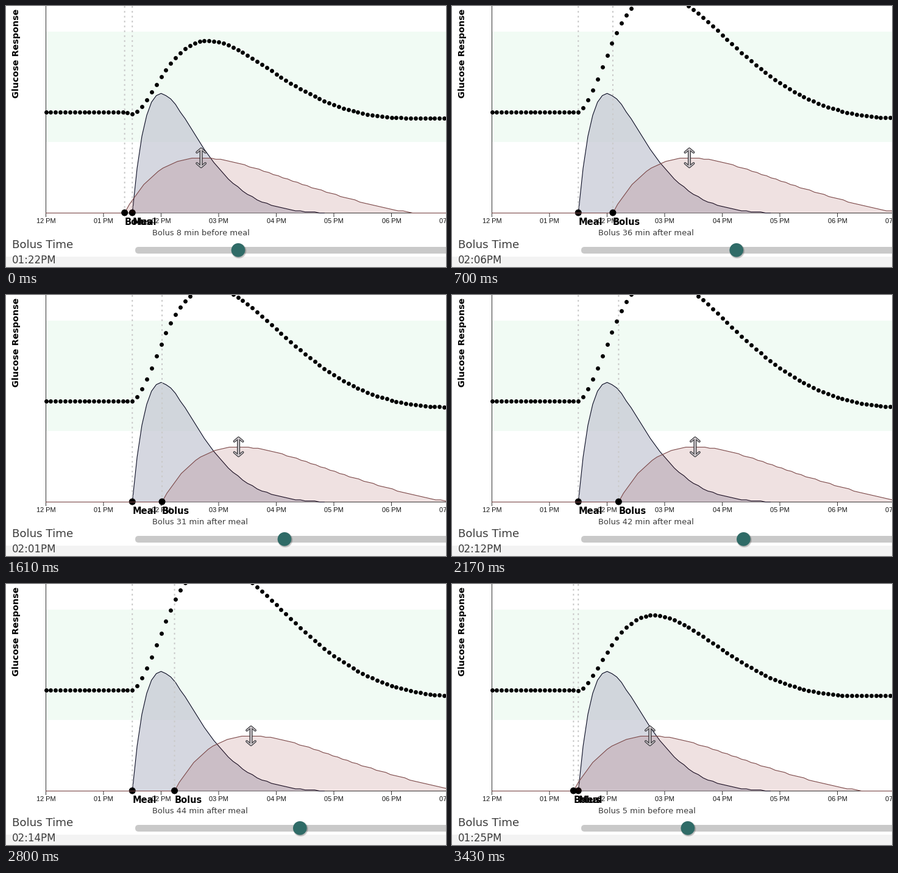
A matplotlib script that plays this animation: 722x428 px, repeating every 3.5 s.

```python
import numpy as np
import matplotlib.pyplot as plt
from matplotlib.animation import FuncAnimation
from matplotlib.patches import Circle, FancyBboxPatch, Rectangle

W, H, DPI = 722, 428, 100
FRAMES, STEP = 50, 70
PX = 72 / DPI                      # points per pixel
LEFT, BASE, PER_MIN = 65.5, 339.5, 94.5 / 60
MEAL = 90                          # minutes after noon
MEAL_HEIGHT, BOLUS_HEIGHT = 196, 90.5
CURVE_UNIT = 1.8                   # curves are drawn in rounded units

# Dragged bolus offset from the meal, in minutes: (frame, offset)
KEYS = np.array([(0, -8), (3, -4), (6, 7), (8, 22), (14, 59), (16, 65),
                 (23, 31), (24, 29), (25, 29), (31, 42), (35, 51), (40, 44),
                 (48, -3), (49, -5), (50, -8)], float)


def offset_at(frame):
    """Monotone cubic through KEYS, rounded to whole minutes."""
    x, y = KEYS.T
    h = np.diff(x)
    d = np.diff(y) / h
    slope = np.zeros(len(x))
    same = d[:-1] * d[1:] > 0
    slope[1:-1][same] = 2 * d[:-1][same] * d[1:][same] / (d[:-1] + d[1:])[same]
    i = min(np.searchsorted(x, frame, side="right") - 1, len(h) - 1)
    u = (frame - x[i]) / h[i]
    value = (y[i] * (1 + 2 * u) * (1 - u) ** 2 + y[i + 1] * u * u * (3 - 2 * u)
             + h[i] * u * (1 - u) * (slope[i] * (1 - u) - slope[i + 1] * u))
    return int(round(value))


def activity(t, peak, duration):
    """Exponential activity curve scaled to a peak of 1."""
    tau = peak * (1 - peak / duration) / (1 - 2 * peak / duration)

    def raw(s):
        return s * (1 - s / duration) * np.exp(-s / tau)
    t = np.clip(t, 0, duration)
    return raw(t) / raw(peak)


def meal_activity(t):
    return activity(t, 30, 200)


def bolus_activity(t):
    return activity(t, 80, 300)


def to_x(minutes):
    return LEFT + minutes * PER_MIN


def curve(start, shape, height, duration):
    t = np.arange(0, duration + 1, 5)
    units = np.round(height * shape(t) / CURVE_UNIT)
    return to_x(start + t), BASE - units * CURVE_UNIT


fig = plt.figure(figsize=(W / DPI, H / DPI), dpi=DPI, facecolor="white")
ax = fig.add_axes([0, 0, 1, 1])
ax.set_xlim(0, W)
ax.set_ylim(H, 0)
ax.axis("off")


def label(x, y, text, size, color="#3c3c3c", family="DejaVu Sans", **kw):
    return ax.text(x, y, text, fontsize=size * PX, color=color,
                   family=family, **kw)


def stroke(x, y, color, width, z, **kw):
    return ax.plot(x, y, color=color, lw=width * PX, zorder=z, snap=False,
                   **kw)[0]


def guide(x):
    return stroke([x, x], [0, BASE], "#cbcbcb", 2, 4.5, dashes=(1.5, 2.5),
                  dash_capstyle="butt")


def marker(x, z):
    return ax.add_patch(Circle((x, 339), 5.5, color="black", lw=0, zorder=z))


# Background, axes and hour ticks
ax.add_patch(Rectangle((0, 411), W, 17, color="#f3f3f3", lw=0, zorder=0))
ax.add_patch(Rectangle((66, 42), W, 181, color="#f1fbf4", lw=0, zorder=0))
stroke([LEFT, LEFT], [0, BASE], "#333333", 1, 2)
stroke([LEFT, W], [BASE, BASE], "#333333", 1, 2)
for hour in range(8):
    x = to_x(hour * 60)
    stroke([x, x], [BASE, BASE + 6], "#333333", 1, 2)
    label(x, 356.5, f"{hour or 12:02d} PM", 11, "#111111", "Liberation Sans",
          ha="center", zorder=3)
label(16.8, 78, "Glucose Response", 14.3, "black", weight="bold", rotation=90,
      ha="center", va="center")

# Meal curve
meal_x = to_x(MEAL)
guide(meal_x)
mx, my = curve(MEAL, meal_activity, MEAL_HEIGHT, 200)
ax.fill(mx, my, color="#c4c7d3", alpha=.7, lw=0, zorder=3)
stroke(mx, my, "#06081f", 1.1, 4)
marker(meal_x, 4.6)
label(meal_x, 359, "Meal", 14.6, "black", weight="bold", zorder=8)

# Bolus curve, moved in update
bolus_guide = guide(0)
bolus_fill = ax.fill([0, 1, 1], [0, 0, 1], color="#8b1a1a", alpha=.13, lw=0,
                     zorder=5)[0]
bolus_line = stroke([], [], "#7a4646", 1.1, 6)
bolus_dot = marker(0, 7)
bolus_label = label(0, 359, "Bolus", 14.6, "black", weight="bold", zorder=8)

# Glucose dots on a five-minute grid
grid = np.arange(0, 425, 5)
meal_rise = np.cumsum(meal_activity(grid - MEAL)) * MEAL_HEIGHT / 10
glucose = stroke(to_x(grid), 0 * grid, "black", 0, 6, marker="o",
                 ms=6.9 * PX, mew=0)

# Double-headed drag arrow: dark outline with a pale core
HEAD = np.array([-7, 0, 7]), np.array([-9, -15, -9])
ARROW = [(np.zeros(2), np.array([-13, 13])), HEAD, (HEAD[0], -HEAD[1])]
arrow = [(stroke([], [], color, width, z, solid_capstyle="round"), px, py + 249)
         for color, widths, z in (("#303034", (5, 3.8, 3.8), 9),
                                  ("#d8d2d6", (2.4, 1.5, 1.5), 10))
         for (px, py), width in zip(ARROW, widths)]

# Slider and texts
ax.add_patch(FancyBboxPatch((217.5, 400.5), W, 0, color="#c9c9c9", lw=0,
                            boxstyle="round,pad=5.5", zorder=3))
shadows = [ax.add_patch(Circle((0, 401.6), r, color="black", alpha=.13, lw=0,
                               zorder=4)) for r in (11.6, 12.5)]
knob = ax.add_patch(Circle((0, 400.3), 11.3, color="#2f6b67", lw=0, zorder=5))
label(10, 397, "Bolus Time", 18.3)
clock = label(10, 422, "", 16.6)
message = label(239.5, 376, "", 13)


def update(frame):
    offset = offset_at(frame)
    start = MEAL + offset
    x = to_x(start)

    bx, by = curve(start, bolus_activity, BOLUS_HEIGHT, 300)
    bolus_fill.set_xy(np.column_stack([bx, by]))
    bolus_line.set_data(np.r_[LEFT, bx, 800], np.r_[BASE, by, BASE])
    bolus_guide.set_xdata([x, x])
    bolus_dot.center = x, 339
    bolus_label.set_x(x)

    drop = np.cumsum(bolus_activity(grid - start)) * 9.11
    glucose.set_ydata(174 - meal_rise + drop)

    for line, px, py in arrow:
        line.set_data(x + 125.5 + px, py)

    slider = 396.6 + 1.948 * offset
    knob.center = slider, 400.3
    for shadow in shadows:
        shadow.center = slider + 1, 401.6

    hour, minute = divmod(start, 60)
    clock.set_text(f"{hour or 12:02d}:{minute:02d}PM")
    side = "before" if offset < 0 else "after"
    message.set_text(f"Bolus {abs(offset)} min {side} meal")
    return []


anim = FuncAnimation(fig, update, frames=FRAMES, interval=STEP, repeat=True,
                     repeat_delay=0, init_func=lambda: update(0))
plt.show()
```
